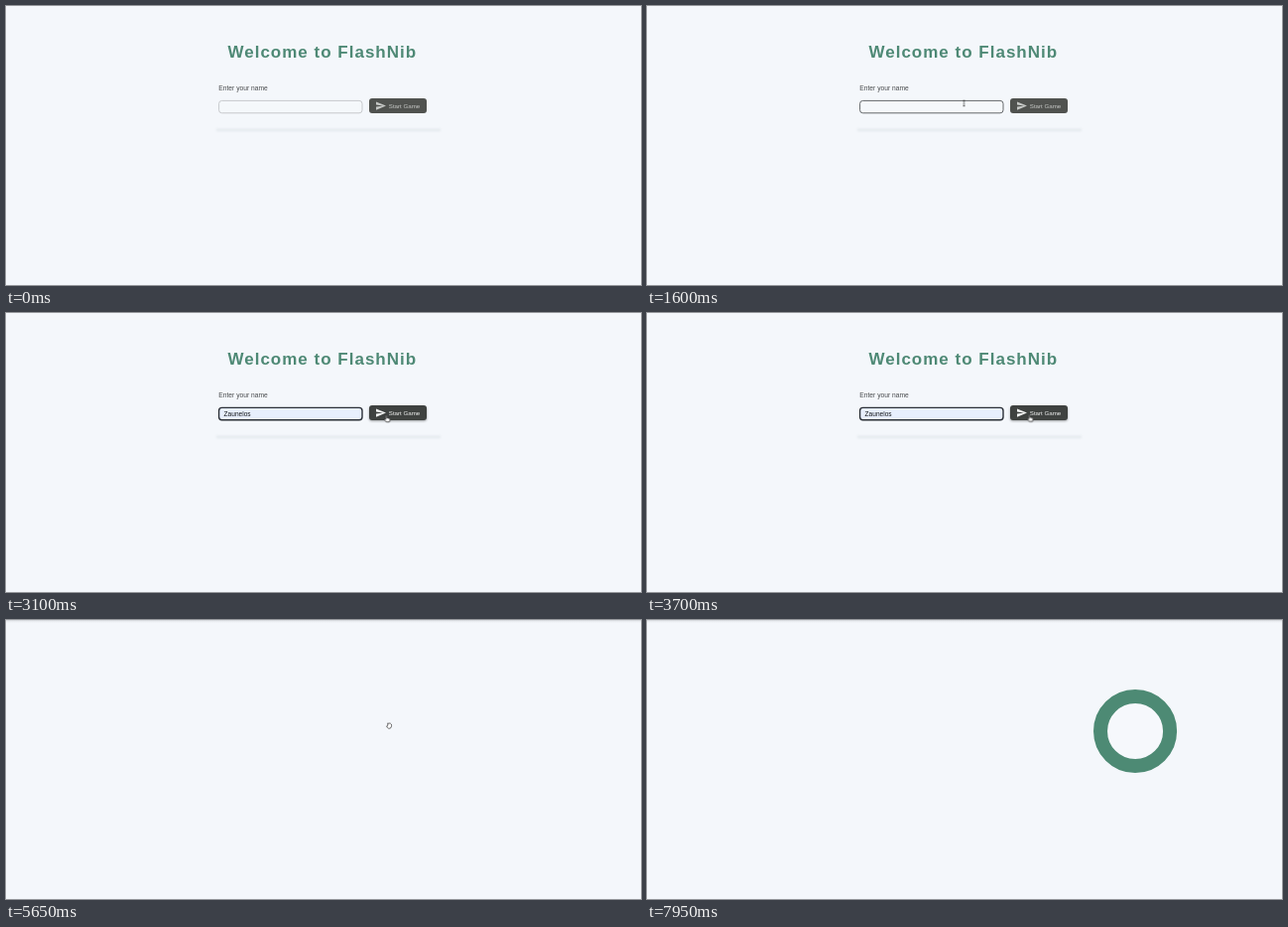
Write an HTML page that moves like this. It is 640 px wide and 281 px high and loops after 8 s.

```html
<!DOCTYPE html>
<html lang="en">
<head>
<meta charset="utf-8">
<title>Welcome to FlashNib</title>
<style>
  html, body { margin: 0; width: 100%; height: 100%; overflow: hidden; background: #f4f7fb; }
  svg { display: block; width: 100vw; height: 100vh; }
  text { font-family: "Liberation Sans", Arial, sans-serif; }

  .title { font-size: 17px; font-weight: bold; letter-spacing: 1px; fill: #4e8975; }
  .label { font-size: 6.7px; fill: #4a4c4e; }
  .preview { font-size: 5.2px; font-weight: bold; fill: #20262b; }
  .value { font-size: 6.57px; fill: #15181c; }
  .caption { font-size: 6.15px; }

  /* every part shares one 8 s clock */
  .step, .move { animation-duration: 8s; animation-iteration-count: infinite; }
  .step { animation-timing-function: step-end; }
  .move { animation-timing-function: linear; }

  .start { animation-name: start; }
  .game { animation-name: game; }
  @keyframes start { 0% { visibility: visible } 57.5%, 100% { visibility: hidden } }
  @keyframes game { 0% { visibility: hidden } 57.5%, 100% { visibility: visible } }

  .field { animation-name: field; }
  @keyframes field {
    0%      { stroke: #c2c5c8; stroke-width: .9px; fill: #f5f8fb }
    16.25%  { stroke: #55585b; stroke-width: .9px; fill: #f5f8fb }
    22.5%   { stroke: #26303a; stroke-width: 1.4px; fill: #f5f8fb }
    27.5%   { stroke: #26303a; stroke-width: 1.4px; fill: #e4eff8 }
    33.125%, 100% { stroke: #2b3037; stroke-width: 1.4px; fill: #e8effd }
  }
  .preview { animation-name: preview; }
  .value { animation-name: value; }
  @keyframes preview { 0% { opacity: 0 } 27.5% { opacity: 1 } 33.125%, 100% { opacity: 0 } }
  @keyframes value { 0% { opacity: 0 } 33.125%, 100% { opacity: 1 } }

  .button { animation-name: button; }
  .face { animation-name: face; }
  @keyframes button { 0% { fill: #50524f } 36.875%, 100% { fill: #3f4240 } }
  @keyframes face { 0% { fill: #c6c8c6 } 36.875%, 100% { fill: #f3f4f3 } }
  .shade { animation-name: shade; }
  @keyframes shade { 0% { opacity: 0 } 36.875%, 100% { opacity: .35 } }

  .pointer { animation-name: pointer; }
  @keyframes pointer {
    0%, 11.25%     { transform: translate(516px, 112px) }
    11.875%        { transform: translate(504px, 109px) }
    16.25%         { transform: translate(358px, 100px) }
    18.75%, 24%    { transform: translate(319.5px, 98px) }
    27.5%, 33.5%   { transform: translate(306px, 109px) }
    36.875%        { transform: translate(367px, 106px); }
    39%, 57.5%     { transform: translate(385.5px, 102.5px) }
    57.51%, 100%   { transform: translate(386px, 103px) }
  }
  .arrow { animation-name: arrow; }
  .beam { animation-name: beam; }
  .hand { animation-name: hand; }
  .fist { animation-name: fist; }
  @keyframes arrow {
    0% { opacity: 0 } 11.25% { opacity: 1 } 16.25% { opacity: 0 }
    26.875% { opacity: 1 } 36.875%, 100% { opacity: 0 }
  }
  @keyframes beam { 0% { opacity: 0 } 16.25% { opacity: 1 } 26.875%, 100% { opacity: 0 } }
  @keyframes hand { 0% { opacity: 0 } 36.875% { opacity: 1 } 57.5%, 100% { opacity: 0 } }
  @keyframes fist { 0% { opacity: 0 } 57.5% { opacity: 1 } 74.375%, 100% { opacity: 0 } }

  .target { animation-name: grow; }
  @keyframes grow {
    0%, 88.125% { transform: translate(492px, 112px) scale(0) }
    100% { transform: translate(492px, 112px) scale(1.0556) }
  }
</style>
</head>
<body>
<svg viewBox="0 0 640 281">
  <defs>
    <linearGradient id="edge" x2="0" y2="1">
      <stop offset="0" stop-color="#cfd2d6"/>
      <stop offset=".45" stop-color="#e9ecf0"/>
      <stop offset="1" stop-color="#f4f7fb"/>
    </linearGradient>
    <filter id="soft" x="-10%" y="-200%" width="120%" height="500%">
      <feGaussianBlur stdDeviation="1.2"/>
    </filter>
  </defs>

  <g class="step start">
    <text class="title" x="223.5" y="52.3">Welcome to FlashNib</text>
    <text class="label" x="214.3" y="85.2">Enter your name</text>
    <rect x="212" y="123.6" width="226" height="2.6" fill="#e4e9ed" filter="url(#soft)"/>

    <rect class="step field" x="214.6" y="95.4" width="144.4" height="12.4" rx="3"/>
    <text class="step preview" x="219.8" y="103.5">Zaunelos</text>
    <text class="step value" x="219.6" y="103.7">Zaunelos</text>

    <rect class="step shade" x="366" y="94.5" width="58" height="14.5" rx="3" filter="url(#soft)"/>
    <rect class="step button" x="366" y="93" width="58" height="15" rx="3"/>
    <g class="step face">
      <path d="M373 96.4 L383 100.5 L373 104.7 V101.4 L380 100.5 L373 99.6 Z"/>
      <text class="caption" x="385.8" y="102.7">Start Game</text>
    </g>
  </g>

  <g class="step game">
    <rect width="640" height="3" fill="url(#edge)"/>
    <circle class="move target" r="35" fill="#f6f8fc" stroke="#4d8a74" stroke-width="14"/>
  </g>

  <g class="move pointer">
    <path class="step arrow" d="M0 0 V6.6 L1.5 5.3 L2.5 7.7 L3.6 7.2 L2.6 4.9 H4.6 Z"
      fill="#111" stroke="#fff" stroke-width=".4"/>
    <path class="step beam" d="M-1 -3 Q0 -3 0 -2 V2 Q0 3 -1 3 M1 -3 Q0 -3 0 -2 M0 2 Q0 3 1 3"
      fill="none" stroke="#333" stroke-width=".7"/>
    <path class="step hand" d="M-.7 .4 Q0 -.4 .6 .4 V2.7 L3 3.2 Q3.8 3.5 3.6 4.5 L3 6.8 H-.2 L-2 4.4 Q-1.7 3.5 -.7 4.2 Z"
      fill="#fff" stroke="#222" stroke-width=".7"/>
    <path class="step fist" d="M-1.2 1.4 Q0 .6 1.6 1.3 Q2.7 1.8 2.6 3.4 Q2.4 6 .9 6.2 H-.4 Q-2 5.4 -2.4 3.9 L-1.2 3.3 Z M-1.2 1.4 L-1.8 .8"
      fill="#fff" stroke="#444" stroke-width=".8"/>
  </g>
</svg>
</body>
</html>
```
